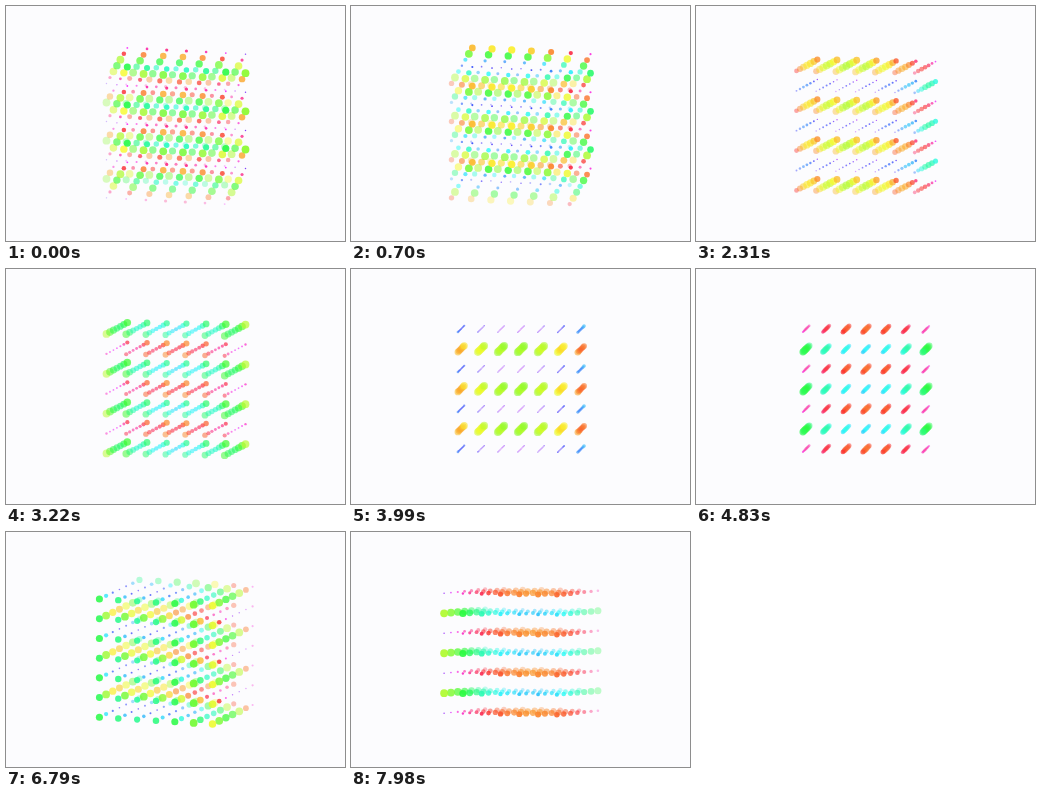
These frames come from a looping animation (339 px wide and 235 px high, 8 s). An HTML page with a canvas:

```html
<!DOCTYPE html>
<html lang="en">
<head>
<meta charset="utf-8">
<title>Dot lattice</title>
<style>
  html, body { margin: 0; width: 100%; height: 100%; overflow: hidden; background: #fcfcfe; }
  canvas { display: block; }
</style>
</head>
<body>
<canvas id="stage" width="339" height="235"></canvas>
<script>
const ctx = document.getElementById('stage').getContext('2d');
const LOOP = 8000, SPACING = 20, HALF = 3, CENTER = { x: 170, y: 120 };
const RAD = Math.PI / 180;

// The lattice rests in each pose, then turns quickly to the next one.
const POSES = [
  { yaw: 10, pitch: 17.5 },
  { yaw: 10, pitch: 5.5 },
  { yaw: 3, pitch: 3 },
  { yaw: 19.5, pitch: 9.7 },
  { yaw: 20, pitch: 2 }
];
const POSE_TIME = 1700, POSE_DELAY = 100, TURN_TIME = 450;

const smooth = p => p * p * (3 - 2 * p);

function poseAt(time) {
  const elapsed = Math.max(0, time - POSE_DELAY);
  const index = Math.floor(elapsed / POSE_TIME);
  const from = POSES[Math.max(0, index - 1)], to = POSES[index];
  const p = smooth(Math.min(1, (elapsed % POSE_TIME) / TURN_TIME));
  const mix = name => (from[name] + (to[name] - from[name]) * p) * RAD;
  return { yaw: mix('yaw'), pitch: mix('pitch') };
}

function drawDot(x, y, hue, alpha) {
  const radius = 2.3 + 1.6 * Math.sin(hue * RAD);
  ctx.fillStyle = `hsla(${hue}, 95%, 57%, ${alpha})`;
  ctx.beginPath();
  ctx.arc(CENTER.x + x * SPACING, CENTER.y + y * SPACING, radius, 0, 2 * Math.PI);
  ctx.fill();
}

function draw(time) {
  const { yaw, pitch } = poseAt(time);
  const cosYaw = Math.cos(yaw), sinYaw = Math.sin(yaw);
  const cosPitch = Math.cos(pitch), sinPitch = Math.sin(pitch);

  const spin = 330 + 0.118 * time;
  const sway = -2 * Math.sin(2 * Math.PI * time / 1610);
  const fade = 0.1 * Math.cos(Math.PI * time / LOOP);
  const order = fade < 0 ? -1 : 1;

  ctx.fillStyle = '#fcfcfe';
  ctx.fillRect(0, 0, 339, 235);

  // The most opaque layer is painted last.
  for (let n = -HALF; n <= HALF; n++) {
    const layer = n * order;
    for (let row = -HALF; row <= HALF; row++) {
      // Colour bands alternate from row to row and follow the tilt in depth.
      const band = 100 * (1 - Math.cos(Math.PI * (row - layer * sinPitch)));
      for (let col = -HALF; col <= HALF; col++) {
        const x = col * cosYaw + layer * sinYaw;
        const y = row * cosPitch + (col * sinYaw - layer * cosYaw) * sinPitch;
        const hue = spin + band - 6 * (x - sway) ** 2;
        drawDot(x, y, hue, 0.6 + fade * layer);
      }
    }
  }
}

const start = performance.now();
function tick() {
  draw((performance.now() - start) % LOOP);
  requestAnimationFrame(tick);
}
tick();
</script>
</body>
</html>
```
